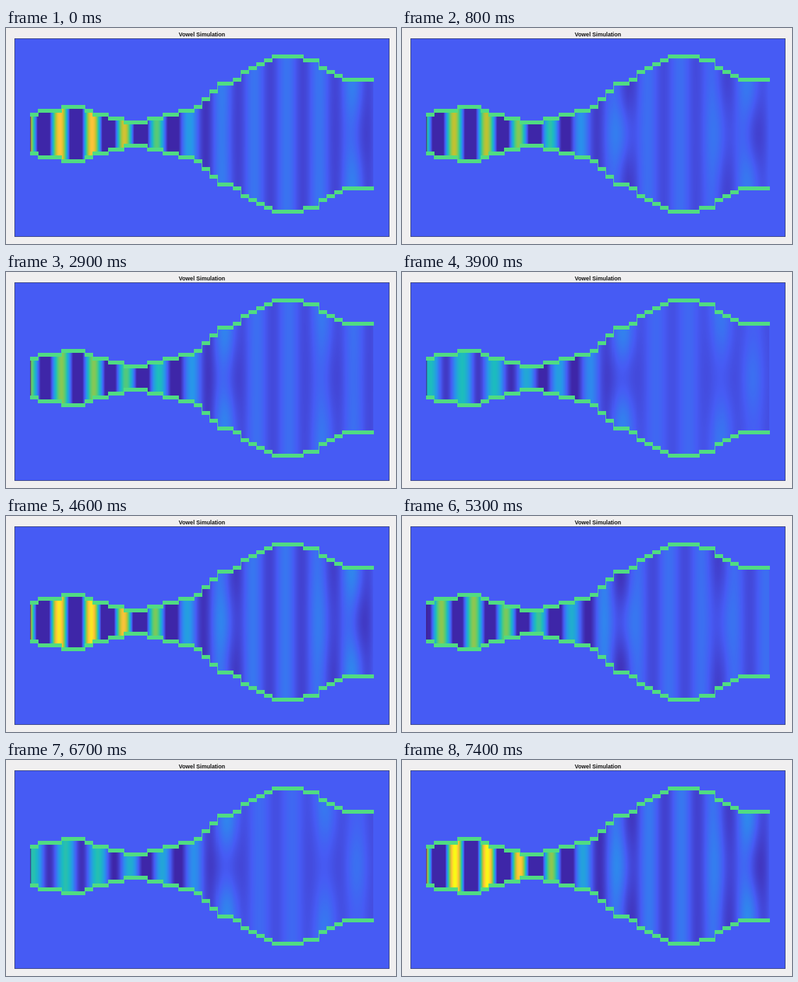
These frames come from a looping animation (600x334 px, 7500 ms). An HTML page with a canvas:

```html
<!DOCTYPE html>
<html lang="en">
<head>
<meta charset="utf-8">
<title>Vowel Simulation</title>
<style>
  html, body { margin: 0; width: 100%; height: 100%; overflow: hidden; background: #f0eff0; }
  main { position: fixed; inset: 0; overflow: hidden; }
  canvas { display: block; }
  h1 {
    position: absolute; left: 13px; top: 5px; width: 577px; margin: 0;
    font: bold 8.7px/10px "Liberation Sans", Arial, sans-serif;
    text-align: center; color: #111;
  }
</style>
</head>
<body>
<main>
  <canvas id="stage" width="600" height="334"></canvas>
  <h1>Vowel Simulation</h1>
</main>
<script>
const W = 600, H = 334, AXIS = 164;
const LEFT = 37, SECTION = 12, SECTIONS = 44, CELL = 6;
const STEP_MS = 100, STEPS = 75;
const WAVELENGTH = 49.8, CREST = 82, LAG = 9;
const REST = 1 / 7; // colour-map position of zero pressure
const RAD = Math.PI / 180;

const ctx = document.getElementById('stage').getContext('2d');

// Piecewise-linear curve through [x, y] points
function curve(points) {
  return x => {
    const i = Math.max(1, points.findIndex(p => x <= p[0]));
    const [x0, y0] = points[i - 1], [x1, y1] = points[i];
    return y0 + (y1 - y0) * (x - x0) / (x1 - x0);
  };
}

// Tube half-height in cells by section, rounded to whole steps
const profile = curve([[0, 0.4], [5, 2.2], [12, -2], [14, -2], [21, 1.9], [24, 8],
  [25, 8.2], [31, 15.4], [34, 14.9], [36, 13.5], [40, 9], [43, 9]]);
const radius = section => 27 + CELL * Math.round(profile(section));

// Smooth drop from 1 to 0 along the tube
const fade = (x, center, width) => 1 / (1 + Math.exp((x - center) / width));
const standing = x => 0.075 + 0.725 * fade(x, 243, 24);
const travelling = x => 0.035 + 0.19 * fade(x, 290, 20);
const offset = x => 0.1 * fade(x, 175, 12);

const crossModes = [
  { center: 340, width: 20, strength: 0.06, delay: 110 },
  { center: 490, width: 20, strength: 0.04, delay: 110 },
  { center: 538, width: 17, strength: 0.055, delay: -20 },
];

const colors = ['3e26a8', '465bf4', '2894eb', '1cbcbe', '5ecc6e', 'bec232', 'fec338', 'f9fb15'];
const channels = [0, 2, 4].map(at =>
  curve(colors.map((hex, i) => [i / (colors.length - 1), parseInt(hex.slice(at, at + 2), 16)])));
const palette = Array.from({ length: 512 }, (_, i) => channels.map(f => Math.round(f(i / 511))));

// Mean, in-phase and quadrature pressure at every pixel inside the tube
function buildField() {
  const field = [];
  const k = 2 * Math.PI / WAVELENGTH;
  for (let x = LEFT; x < LEFT + SECTION * SECTIONS; x++) {
    const r = radius(Math.floor((x - LEFT) / SECTION));
    const d = x + 0.5 - CREST;
    for (let y = AXIS - r; y < AXIS + r; y++) {
      let p = standing(x) * Math.cos(k * d);
      let q = travelling(x) * Math.cos(k * (d - LAG));
      const across = -Math.cos(Math.PI * (y + 0.5 - AXIS) / r);
      for (const { center, width, strength, delay } of crossModes) {
        const e = strength * across * Math.exp(-(((x - center) / width) ** 2));
        p += e * Math.cos(delay * RAD);
        q += e * Math.sin(delay * RAD);
      }
      field.push({ at: 4 * (y * W + x), mean: REST + offset(x), p, q });
    }
  }
  return field;
}

function drawWalls() {
  ctx.fillStyle = '#50dc82';
  for (let i = 0; i < SECTIONS; i++) {
    const x = LEFT + SECTION * i, r = radius(i);
    ctx.fillRect(x, AXIS - r - CELL, SECTION + 1, CELL);
    ctx.fillRect(x, AXIS + r, SECTION + 1, CELL);
    const rise = i ? Math.abs(r - radius(i - 1)) : 0;
    if (rise > CELL) {
      const low = Math.min(r, radius(i - 1));
      ctx.fillRect(x, AXIS - low - rise, 1, rise);
      ctx.fillRect(x, AXIS + low, 1, rise);
    }
  }
}

ctx.fillStyle = '#f0eff0';
ctx.fillRect(0, 0, W, H);
ctx.fillStyle = '#' + colors[1];
ctx.fillRect(13, 16, 577, 307);
ctx.strokeStyle = '#38427f';
ctx.strokeRect(13.5, 16.5, 576, 306);

const field = buildField();
const picture = ctx.getImageData(0, 0, W, H);

function render(step) {
  const turn = (20 + 38.5 * step) * RAD;
  const angle = turn + 12 * RAD * Math.sin(turn);
  const gain = 0.8 + 0.2 * step / STEPS;
  const c = gain * Math.cos(angle), s = gain * Math.sin(angle);
  for (const { at, mean, p, q } of field) {
    const v = Math.max(0, Math.min(1, mean + p * c + q * s));
    picture.data.set(palette[Math.round(v * 511)], at);
  }
  ctx.putImageData(picture, 0, 0);
  drawWalls();
  ctx.fillStyle = 'rgba(66, 34, 130, 0.75)';
  ctx.fillRect(LEFT, AXIS - radius(0), 1.5, 2 * radius(0));
}

const start = performance.now();
let shown = -1;
function tick() {
  const step = Math.floor((performance.now() - start) / STEP_MS) % STEPS;
  if (step !== shown) render(shown = step);
  requestAnimationFrame(tick);
}
tick();
</script>
</body>
</html>
```
